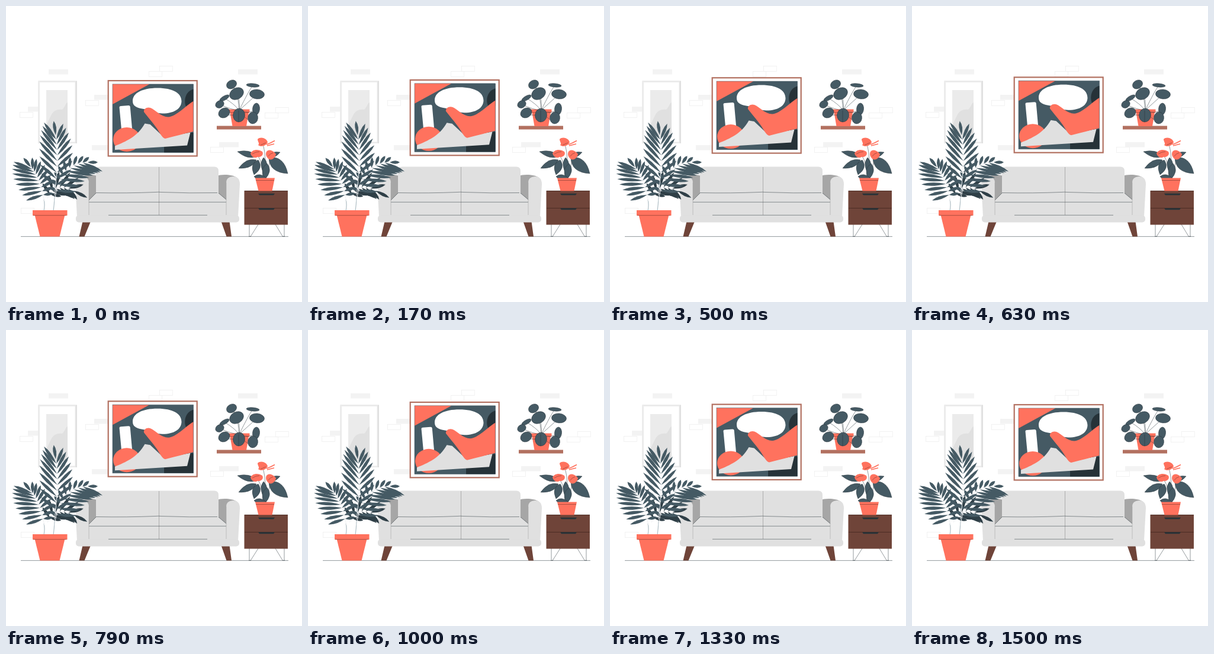
An HTML page for the animation above (1540 ms loop, 500 px wide and 500 px high).

```html
<!DOCTYPE html>
<html lang="en">
<head>
<meta charset="utf-8">
<title>Living room</title>
<style>
html, body { margin: 0; width: 100%; height: 100%; overflow: hidden; background: #fff; }
svg { display: block; width: 100vw; height: 100vh; }
.coral { fill: #ff725e; }
.slate { fill: #455a64; }
.ink { fill: #263238; }
.grey { fill: #e0e0e0; }
.wood { fill: #6f4439; }
.thin { fill: none; stroke: #263238; stroke-width: .5; }
.edge { fill: none; stroke: #8c3f34; stroke-width: .7; }
.leaf { fill: #455a64; stroke: #263238; stroke-width: .5; }
.shade { fill: #2f3f47; }
</style>
</head>
<body>
<svg viewBox="0 0 500 500">
  <g id="bricks"></g>

  <!-- mirror -->
  <rect class="grey" x="54.500" y="126.500" width="65.500" height="105.500"/>
  <rect x="54.500" y="126.500" width="63" height="105.500" fill="#ebebeb"/>
  <rect x="57" y="129" width="59.500" height="100.500" fill="#fff"/>
  <rect x="68" y="142" width="36" height="80" fill="#ebebeb"/>
  <path class="grey" d="M104 163C99 165 99 174 94 175C86 174 81 177 77 183C74 190 70 196 68 203V222H104Z"/>

  <!-- poster -->
  <g id="poster">
    <rect x="172.700" y="126.200" width="150" height="127.300" fill="#fff" stroke="#b27060" stroke-width="2.200"/>
    <clipPath id="art"><rect x="180" y="132" width="136.700" height="115.700"/></clipPath>
    <g clip-path="url(#art)">
      <rect class="slate" x="180" y="132" width="137" height="116"/>
      <path class="coral" d="M180 132H242.500L180 166Z"/>
      <path class="ink" d="M317 140.500C305 143 299 157 304 170H317Z"/>
      <path class="ink" d="M267 214H317V248H267Z"/>
      <path fill="#fff" d="M214 160.500C214 147 230 138.500 256 138.500C282 138.500 296.500 147 296.500 161C296 174 283 181.700 264 181.500C249 181 241 175 230 173.500C219 171.500 214 168 214 160.500Z"/>
      <path fill="#fff" d="M191.500 171Q191.500 169 194 169L207 168Q209.500 168 209.700 170L213 207L195 208.500Z"/>
      <ellipse class="coral" cx="204" cy="225.500" rx="23" ry="20.500"/>
      <path class="grey" d="M184 236.500C202 229 222 221 234.500 198.500L243.500 200L267 222L311.500 213.500L306 235.500L184 243Z"/>
      <path class="coral" d="M233 179C232 174 238 170 244 172C252 175 262 187.500 274 187.500C287 187 304 168 317 160.500V212C302 215 286 220 269 224C263 222.500 260 214 255 207C248 197 239 187 233 179Z"/>
    </g>
    <rect x="180" y="132" width="136.700" height="115.700" fill="none" stroke="#455a64" stroke-width=".5"/>
  </g>

  <path class="thin" d="M25 389.400H477"/>

  <!-- sofa -->
  <path class="wood" d="M129.500 364H143L132.500 389.500H123.500ZM363.500 364H377.500L381 389.500H372.500Z"/>
  <path fill="#a6a6a6" d="M155 287C146 284 132 285 126 290L140 330H155ZM356 287C364 284 382 284 390 290L372 330H357Z"/>
  <path class="grey" d="M152 318V279Q152 271.500 159 271.500H352Q359 271.500 359 279V318Z"/>
  <path class="grey" d="M140 355V328L152 316H359L372 327V355Z"/>
  <path class="grey" d="M120 356L117 301Q117 288 129 288Q140 289 140 298V356ZM392 356L395 301Q395 288 383 288Q372 289 372 298V356Z"/>
  <rect class="grey" x="118" y="353.500" width="276" height="12" rx="5"/>
  <g class="thin">
    <path d="M258.500 272V353" stroke="#777"/>
    <path d="M140 331.300H372M173 353.300H340M152 315.500Q205 316.500 252 314.500Q258 314 262 314.500Q310 316.500 357 315.500M140 328L152 316M372 327L359 316"/>
    <path d="M372 298V353M140 298V353" stroke="#999"/>
  </g>

  <!-- palm -->
  <path d="M64 346Q66 335 64 327M80 346Q83 325 82 300" fill="none" stroke="#b0bec5" stroke-width="1.200"/>
  <g id="palm"></g>
  <path class="coral" d="M48.500 353H99.500L90.500 389.500H57.500Z"/>
  <rect class="coral" x="45" y="345" width="58.500" height="9"/>
  <path class="edge" d="M46 353.700H102"/>

  <!-- shelf plant -->
  <rect x="356" y="202.500" width="75" height="6" fill="#b27060"/>
  <path class="coral" d="M376 174.500H411.500V180H410L406 203H382.500L378.500 180H376Z"/>
  <path class="edge" d="M378.500 180H410"/>
  <g id="shelf"></g>
  <path class="thin" d="M393 176V196"/>

  <!-- nightstand -->
  <path class="thin" d="M411 369V389.500M426 369L413 389.500M410 389.300H414M455 369L467.500 389.500M470 369V389.500M467 389.300H471" stroke-width=".7"/>
  <rect class="wood" x="402.500" y="312" width="73.500" height="57.500"/>
  <path d="M403 312.400H476M403 341.500H476" fill="none" stroke="#43261f" stroke-width=".8"/>
  <path class="ink" d="M426 316.800H454L452 319.500H428ZM426 341.500H454L452 344.300H428Z"/>

  <!-- flower plant -->
  <path class="thin" d="M436 292Q441 260 434 232M434 292Q434 265 425 252M438 292Q446 270 446 252"/>
  <g id="foliage"></g>
  <path class="coral" d="M425 225C430 220 440 223 442 230C440 236 431 239 426 235C429 232 425 229 425 225Z"/>
  <path class="coral" d="M413 249C416 242 426 241 433 246C436 251 431 256 425 255C420 258 415 255 413 249Z"/>
  <path class="coral" d="M440 246C444 241 451 244 456 250C455 257 448 262 443 258C439 254 438 250 440 246Z"/>
  <path d="M440 234Q446 232 454 227.500M441 236L453 233" fill="none" stroke="#ff725e" stroke-width="1.800"/>
  <path class="edge" d="M430 235L439 231M416 250Q422 246 428 246M443 254Q446 249 451 248"/>
  <path class="coral" d="M421 290.500H454L449.500 312.500H426.500Z"/>
  <path class="edge" d="M422 294.500H453"/>
</svg>
<script>
const byId = id => document.getElementById(id);
const LOOP = 1540, LEAD = 55, RISE = 6;

const brick = (w, h, look) => ([x, y]) => `<rect x="${x}" y="${y}" width="${w}" height="${h}" ${look}/>`;
const outlined = [[241.5, 110.5], [259.5, 101.5], [23.5, 179.5], [134.5, 159.5],
  [345.5, 238.5], [437.5, 180.5], [455.5, 171.5], [25.5, 341.5]];
const solid = [[72, 107], [392, 107], [37, 170], [149, 150], [145, 235], [360, 230]];
byId('bricks').innerHTML =
  outlined.map(brick(22, 9, 'fill="#fff" stroke="#efefef" stroke-width=".8"')).join('') +
  solid.map(brick(33, 8.5, 'fill="#f3f3f3"')).join('');

// Round leaves: left ones lean outwards, right ones lie almost flat.
function pad([x, y, rx, ry]) {
  const tilt = x < 393 ? -30 : 5;
  return `<path class="thin" d="M394 176Q${(x + 394) / 2 + 4} ${y + 10} ${x} ${y}"/>
    <ellipse class="leaf" rx="${rx}" ry="${ry}" transform="translate(${x} ${y}) rotate(${tilt})"/>`;
}
byId('shelf').innerHTML = [[381, 132.5, 9, 7], [417, 134, 11, 3], [389.5, 148, 12.5, 9.5],
  [424, 149, 12.5, 8], [369, 155.5, 9, 3.5], [361, 166, 7.5, 6], [368.5, 180.5, 10, 8],
  [422.5, 174, 6, 10], [417, 189, 8.5, 10], [393.5, 184.5, 10, 11.5]].map(pad).join('');

// A leaf from its base to its tip, bulging by w on each side; belly places the widest part.
function leaf(x, y, u, v, w, look = 'leaf', belly = .55) {
  const dx = u - x, dy = v - y, len = Math.hypot(dx, dy);
  const nx = -dy / len * w, ny = dx / len * w;
  const mx = x + dx * belly, my = y + dy * belly;
  return `<path class="${look}" d="M${x} ${y}Q${mx + nx} ${my + ny} ${u} ${v}Q${mx - nx} ${my - ny} ${x} ${y}Z"/>`;
}
byId('foliage').innerHTML = [[424, 254, 391, 246, 10], [423, 260, 393, 274, 11],
  [442, 255, 463, 247, 8], [444, 256, 476, 283, 19], [435, 256, 437, 284, 10],
  [426, 260, 419, 285, 13], [441, 266, 437, 293, 12], [419, 288, 440, 291, 9]]
  .map(a => leaf(...a, 'leaf', .4)).join('');

// Blades leave the stem in pairs, opening wider and growing longer towards the base.
function frond({ stem: [a, b, c], pairs, left, right, tip, open, look = 'slate' }) {
  let out = '';
  for (let i = 0; i <= pairs; i++) {
    const back = i / pairs, t = 1 - .85 * back, s = 1 - t;
    const [x, y] = [0, 1].map(k => s * s * a[k] + 2 * s * t * b[k] + t * t * c[k]);
    const [dx, dy] = [0, 1].map(k => s * (b[k] - a[k]) + t * (c[k] - b[k]));
    const dir = Math.atan2(dy, dx);
    const blade = (turn, size) => leaf(x, y, x + size * Math.cos(dir + turn), y + size * Math.sin(dir + turn), 5.5, look, .6);
    if (!i) { out += blade(0, tip); continue; }
    const turn = .45 + (open - .45) * back;
    const grow = .7 + .3 * Math.sin(Math.PI * back);
    out += blade(-turn, left * grow) + blade(turn, right * grow);
  }
  return out + `<path d="M${a}Q${b} ${c}" fill="none" stroke="#eceff1" stroke-width=".9"/>`;
}
byId('palm').innerHTML = [
  { stem: [[70, 325], [82, 296], [114, 312]], pairs: 6, left: 31, right: 28, tip: 26, open: 1.2, look: 'shade' },
  { stem: [[82, 330], [90, 264], [138, 264]], pairs: 9, left: 18, right: 46, tip: 17, open: 1.4 },
  { stem: [[82, 320], [90, 260], [84, 218]], pairs: 9, left: 45, right: 37, tip: 24, open: 1 },
  { stem: [[65, 330], [58, 292], [42, 272]], pairs: 9, left: 43, right: 25, tip: 20, open: 1.65 }
].map(frond).join('');

const poster = byId('poster');
function draw(now) {
  const phase = (now + LEAD) / LOOP * 2 * Math.PI;
  const y = -RISE / 2 * (1 - Math.cos(phase));
  poster.setAttribute('transform', `translate(0 ${y.toFixed(3)})`);
}
const start = performance.now();
function tick() {
  draw((performance.now() - start) % LOOP);
  requestAnimationFrame(tick);
}
tick();
</script>
</body>
</html>
```
